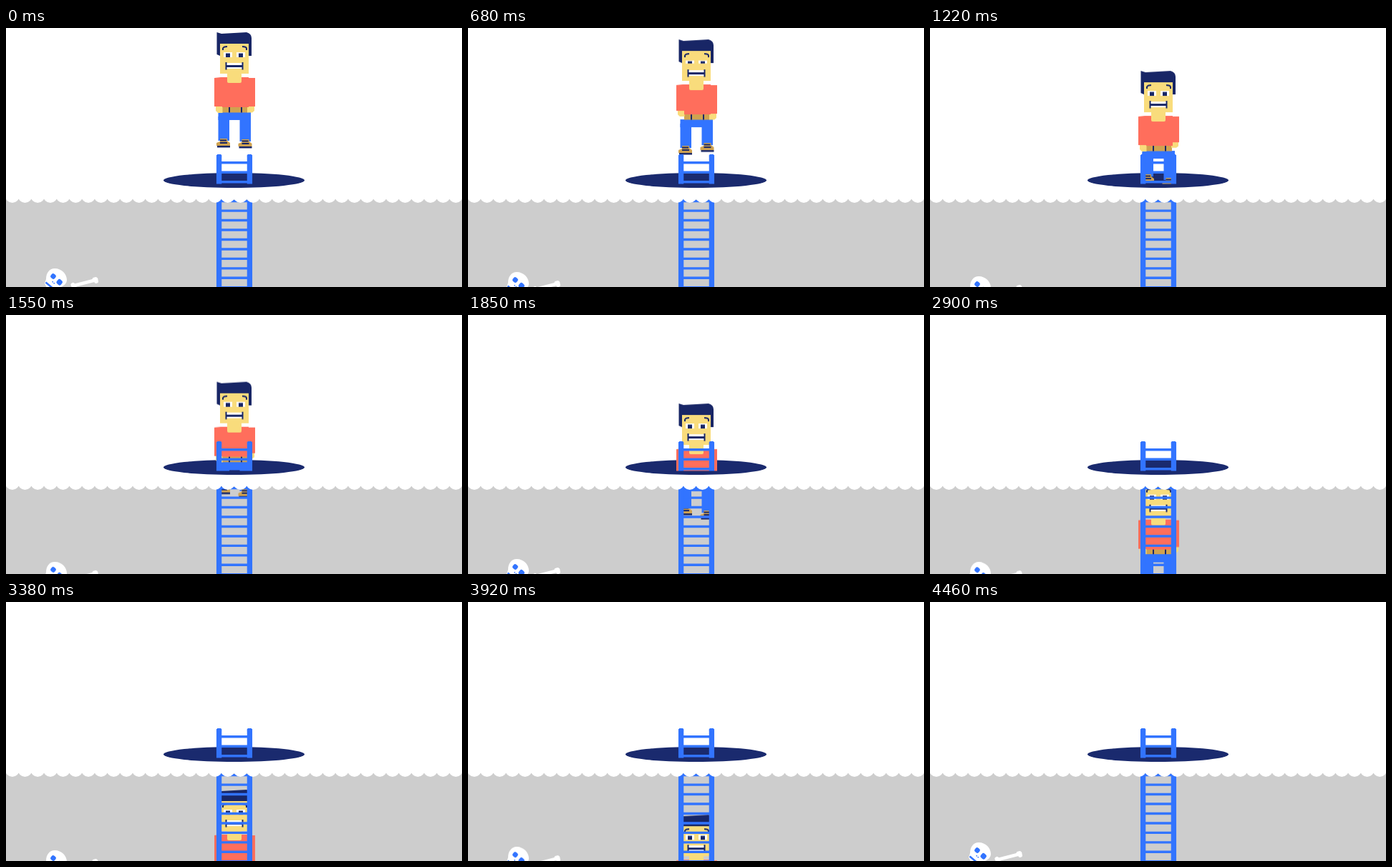
Animation of 637 by 363 pixels, one loop 4520 ms. Source, as an HTML page without scripts:

```html
<!DOCTYPE html>
<html lang="en">
<head>
<meta charset="utf-8">
<title>Down the ladder</title>
<style>
@property --gait { syntax: "<angle>"; inherits: true; initial-value: 0deg; }

html, body { margin: 0; width: 100%; height: 100%; overflow: hidden; background: #fff; }
svg { display: block; width: 100%; height: 100%; }

.navy { fill: #182666; }
.blue { fill: #3274ff; }
.skin { fill: #f9dc7c; }
.red { fill: #ff6e5c; }
.tan { fill: #cfa250; }
.white { fill: #fff; }
.line { fill: none; stroke: #182666; stroke-width: 2; }
.bone { fill: none; stroke: #fff; stroke-linecap: round; }

.man { animation: climb 4.52s linear infinite, gait 4.52s linear infinite; }
.eyes { transform-origin: 0 38px; animation: blink 4.52s linear infinite; }
.remains { animation: bob 4.52s linear infinite; }

/* each foot lifts together with the opposite hand */
.man { --right: max(0, sin(var(--gait))); --left: max(0, -1 * sin(var(--gait))); }
.foot.l { transform: translateY(calc(var(--left) * -5px)); }
.foot.r { transform: translateY(calc(var(--right) * -5px)); }
.arm { transform-origin: 0 69px; }
.arm.l { transform: scaleY(calc(1 - .1 * var(--right))); }
.arm.r { transform: scaleY(calc(1 - .12 * var(--left))); }

@keyframes climb {
  0%, 5.75% { transform: translateY(0); }
  9.96% { transform: translateY(2px); }
  15.04% { transform: translateY(10px); }
  17.04% { transform: translateY(17px); }
  26.99% { transform: translateY(54px); }
  40.93% { transform: translateY(118px); }
  54.2% { transform: translateY(177px); }
  65.49% { transform: translateY(223px); }
  74.78% { transform: translateY(257px); }
  88.72% { transform: translateY(298px); }
  98.62% { transform: translateY(323px); opacity: 1; }
  98.63%, 100% { transform: translateY(323px); opacity: 0; }
}
@keyframes gait {
  0%, 6.04% { --gait: 0deg; }
  100% { --gait: 4605deg; }
}
@keyframes blink {
  0%, 12.5%, 17.5%, 100% { transform: scaleY(1); }
  14.3%, 15.7% { transform: scaleY(.62); }
}
@keyframes bob {
  0%, 6.5% { transform: translateY(0); }
  10.5% { transform: translateY(1.5px); }
  15.04% { transform: translateY(5px); }
  21% { transform: translateY(9.2px); }
  26.99% { transform: translateY(11px); }
  34% { transform: translateY(9px); }
  40.93% { transform: translateY(5px); }
  47.8% { transform: translateY(0); }
  54.2% { transform: translateY(4px); }
  63% { transform: translateY(9px); }
  74.78% { transform: translateY(11px); }
  82% { transform: translateY(9px); }
  88.72% { transform: translateY(5px); }
  96%, 100% { transform: translateY(0); }
}
</style>
</head>
<body>
<svg viewBox="0 0 637 363" preserveAspectRatio="none">
  <defs>
    <clipPath id="open">
      <path d="M0 0H637V218.5H0ZM0 239H637V363H0Z"/>
    </clipPath>
    <g id="shoe">
      <path class="tan" d="M299 155H309V158L313 161V165H294V161L299 159Z"/>
      <path class="navy" d="M295 165H313V167.5H295Z"/>
      <path class="line" stroke-width="1.5" d="M299 157.5H308M299 161H309"/>
    </g>
    <g id="eye">
      <path class="white" d="M304 34H316V41H304Z"/>
      <path class="navy" d="M307 35.5H313V41H307Z"/>
    </g>
  </defs>

  <path fill="#cdcdcd" d="M0 239H637V363H0Z"/>
  <ellipse cx="318.5" cy="213.5" rx="98.5" ry="10.5" fill="#1a2a6e"/>

  <g class="remains">
    <path class="white" d="M56 352C56 343 61 337 68 337C78 337 85 345 85 353C85 358 81 361 77 363L72 371L58 366L54 358Z"/>
    <path d="M55.5 356.5L65 364.5" stroke="#3274ff" stroke-width="2.5"/>
    <rect class="blue" x="62.5" y="344.5" width="7" height="7" rx="2.5" transform="rotate(40 66 348)"/>
    <rect class="blue" x="71" y="352.5" width="7.5" height="7.5" rx="2.5" transform="rotate(40 74.7 356.2)"/>
    <path class="blue" d="M64.5 355h1.5v1.5h-1.5zM66.5 357h1.5v1.5h-1.5z"/>
    <path class="bone" stroke-width="4.5" d="M95 361L124 353.5"/>
    <path class="bone" stroke-width="6" d="M93.5 360L95.5 363.5M123.5 352.5H125.5M125 352L126 355"/>
  </g>

  <g clip-path="url(#open)">
    <g class="man">
      <g class="foot l">
        <path class="blue" d="M296.5 124H312V158H296.5Z"/>
        <use href="#shoe"/>
      </g>
      <g class="foot r">
        <path class="blue" d="M326.5 124H342V159H326.5Z"/>
        <use href="#shoe" x="30.5" y="1"/>
      </g>
      <path class="blue" d="M296.5 118H342V129H296.5Z"/>
      <path class="tan" d="M302 110H338V118.5H302Z"/>
      <path class="line" d="M312 111V118.5M329 111V118.5"/>
      <g class="arm l">
        <path class="skin" d="M293 108H302.5V119H296L293 116Z"/>
        <path class="red" d="M291 70H303V110H291Z"/>
      </g>
      <g class="arm r">
        <path class="skin" d="M337 108H347V116L344 118.5H337Z"/>
        <path class="red" d="M336 70H348V110H336Z"/>
      </g>
      <path class="red" d="M300 69H339V111H302V80H291V70Z"/>
      <path class="skin" d="M309 62H329V75Q329 77 327 77H311Q309 77 309 75Z"/>
      <path class="skin" d="M299 20H339V64H299Z"/>
      <path class="navy" d="M294.5 6L301 8L336 6Q343 8 343 14V39H339V22H299V39L294.5 37Z"/>
      <path class="line" d="M303 31V28.5Q304 26 309 26M330 26Q335.5 26 336 28.5V31"/>
      <g class="eyes">
        <use href="#eye"/>
        <use href="#eye" x="18"/>
      </g>
      <path class="white" d="M307 49H331V57H307Z"/>
      <path class="line" d="M307.5 48V58.5M330.5 48V58.5"/>
      <path class="navy" d="M307 52H331V55H307Z"/>
    </g>
    <g fill="none" stroke="#3274ff">
      <path stroke-width="36" stroke-dasharray="3.4 10.06" d="M319 187.1V363"/>
      <path stroke-width="7.3" d="M297.6 178V363M340.4 178V363"/>
      <path stroke-width="5.5" stroke-linecap="round" d="M296.8 180H298.4M339.6 180H341.2"/>
      <path stroke-width="2" d="M295 178H300.5M337.5 178H343"/>
    </g>
  </g>

  <!-- scalloped edge of the surface -->
  <path class="bone" stroke-width="20" stroke-dasharray="0 17.7" d="M8.85 235H640"/>
</svg>
</body>
</html>
```
